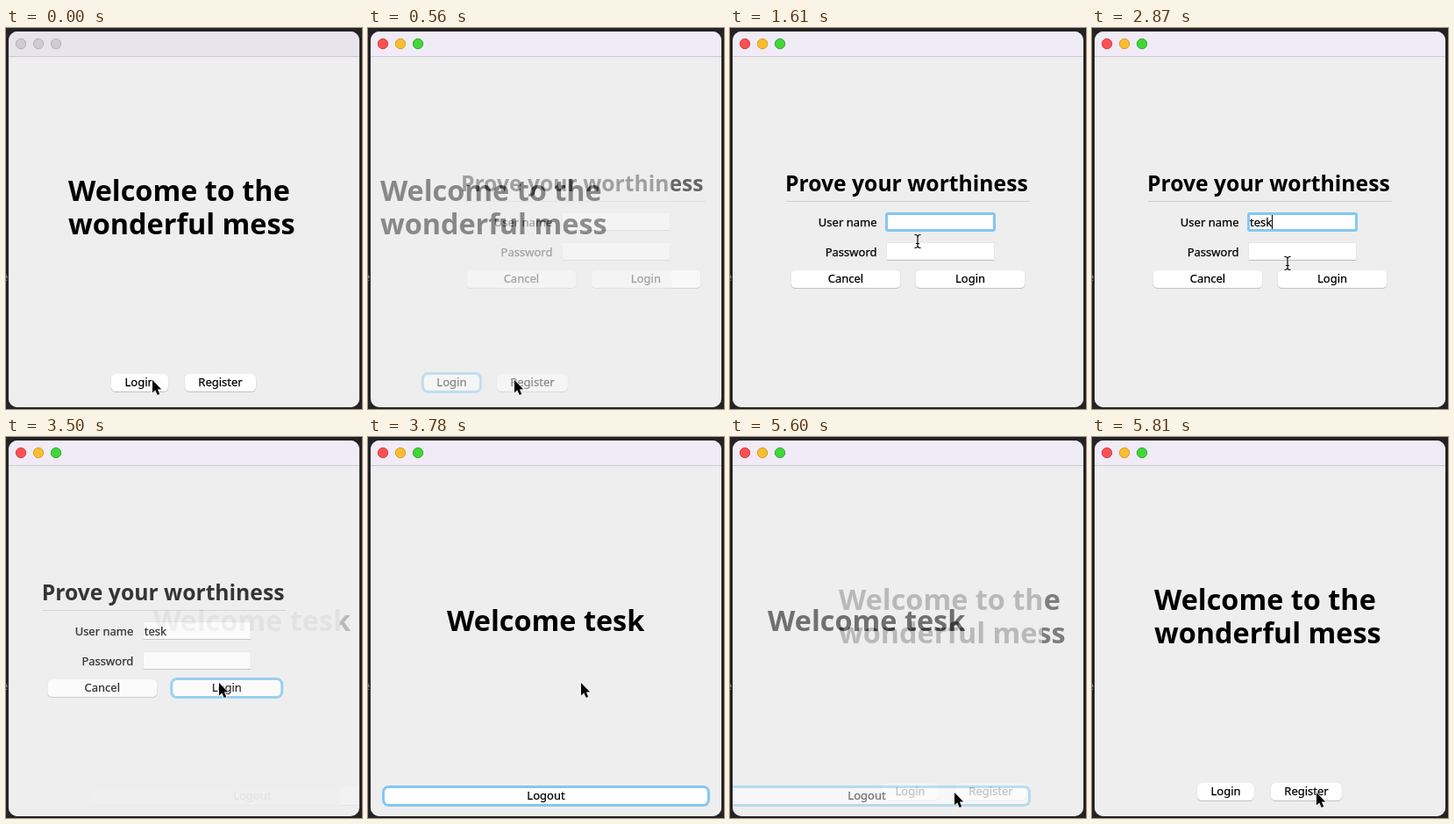
These frames come from a looping animation (406 px wide and 434 px high, 5880 ms). An HTML page:

```html
<!DOCTYPE html>
<html lang="en">
<head>
<meta charset="utf-8">
<title>Sliding login</title>
<style>
  html, body { margin: 0; width: 100%; height: 100%; overflow: hidden; background: #242225; }
  svg { display: block; width: 406px; height: 434px; }
  text { font-family: "Noto Sans", "Open Sans", sans-serif; font-size: 13px; fill: #000; stroke: #000; stroke-width: .25px; }
  .big { font-size: 32.4px; font-weight: 700; stroke: none; }
  .head { font-size: 24.7px; font-weight: 700; stroke: none; }
  .mid { text-anchor: middle; }
  .end { text-anchor: end; }
  .ring { fill: none; stroke: #83c8f2; stroke-width: 3; }
</style>
</head>
<body>
<svg viewBox="0 0 406 434">
  <defs>
    <clipPath id="win"><rect x="3" y="4" width="400" height="428" rx="10"/></clipPath>
    <clipPath id="pane"><rect x="3" y="33" width="400" height="399"/></clipPath>
  </defs>
  <rect width="406" height="434" fill="#242225"/>
  <text x="-5" y="288" style="fill:#8a888b;stroke:none">e</text>
  <g clip-path="url(#win)">
    <rect x="3" y="4" width="400" height="428" fill="#eee"/>
    <rect id="bar" x="3" y="4" width="400" height="28"/>
    <rect x="3" y="32" width="400" height="1" fill="#cdcbcf"/>
    <g id="lights"></g>
    <g id="cards" clip-path="url(#pane)"></g>
  </g>
  <path id="arrow" d="M0 0V14.6L3.3 11.5L5.7 17L8.2 15.9L5.9 10.6H10.2Z" stroke="#fff" stroke-width="1.2" stroke-linejoin="round" paint-order="stroke"/>
  <g id="beam" fill="none" stroke-linecap="square">
    <path d="M-3 -7.5Q0 -7.5 0 -5Q0 -7.5 3 -7.5M0 -5V5M-3 7.5Q0 7.5 0 5Q0 7.5 3 7.5M-1.5 2.5H1.5" stroke="#fff" stroke-width="2.6" opacity=".7"/>
    <path d="M-3 -7.5Q0 -7.5 0 -5Q0 -7.5 3 -7.5M0 -5V5M-3 7.5Q0 7.5 0 5Q0 7.5 3 7.5M-1.5 2.5H1.5" stroke="#000" stroke-width="1.2"/>
  </g>
</svg>
<script>
const LOOP = 5880, TICK = 70, SLIDE = 400, SHIFT = 100;
const NAME = 'tesk';
const $ = id => document.getElementById(id);
const show = (el, on) => el.setAttribute('display', on ? 'inline' : 'none');

const ring = (id, x, y, w, h, r) =>
  `<rect id="${id}" class="ring" x="${x - .5}" y="${y - .5}" width="${w + 1}" height="${h + 1}" rx="${r}"/>`;

const button = (label, x, y, w, id) => `
  <rect x="${x - .5}" y="${y}" width="${w + 1}" height="21" rx="6" fill="#dcdcdc"/>
  <rect x="${x}" y="${y + .6}" width="${w}" height="20.4" rx="5.5" fill="#c2c2c2"/>
  <rect x="${x}" y="${y}" width="${w}" height="20" rx="5.5" fill="#fff"/>
  ${id ? ring(id, x, y, w, 20, 6) : ''}
  <text class="mid" x="${x + w / 2}" y="${y + 14.3}">${label}</text>`;

const field = y => `
  <rect x="178.5" y="${y - .5}" width="123" height="20.5" fill="#e0e0e0"/>
  <rect x="179" y="${y}" width="122" height="19" fill="#fff"/>
  <rect x="179" y="${y + 19}" width="122" height="1" fill="#bdbdbd"/>`;

const pages = [
  `<text class="big" x="71" y="197">Welcome to the</text>
   <text class="big" x="71" y="235">wonderful mess</text>
   ${button('Login', 120, 394, 65, 'ringStart')}
   ${button('Register', 204, 394, 81)}`,
  `<text class="head" x="63" y="186">Prove your worthiness</text>
   <rect x="64" y="197" width="278" height="1" fill="#d0d0d0"/>
   <text class="end" x="167.5" y="226">User name</text>
   <text class="end" x="167.5" y="260">Password</text>
   ${field(211)}${field(245)}
   ${ring('ringUser', 179, 212, 122, 18, 1.5)}
   <text id="typed" x="180" y="226"></text>
   <rect id="caret" y="213" width="1" height="16"/>
   ${button('Cancel', 69.5, 276, 125)}
   ${button('Login', 211.5, 276, 125, 'ringLogin')}`,
  `<text class="big mid" x="202.7" y="221">Welcome ${NAME}</text>
   ${button('Logout', 18, 399, 370, 'ringOut')}`
];

$('cards').innerHTML = pages.map(p =>
  `<g><rect x="3" y="33" width="400" height="399" fill="#eee"/>${p}</g>`).join('');
const cards = [...$('cards').children];

$('lights').innerHTML = [17, 37, 57].map(x => `<circle cx="${x}" cy="18" r="5.7"/>`).join('');
const lights = [...$('lights').children];
const lit = [['#fa5054', '#d93f43'], ['#f8bd30', '#d99e22'], ['#44d43c', '#2fae2b']];
const dim = ['#cfcad3', '#b5b0b9'];

const slides = [341, 3378, 5408];
const keys = [2170, 2450, 2660, 2800];
// start, end, x, y
const moves = [
  [980, 1610, 214, 243],
  [2730, 2870, 223, 268],
  [2870, 3220, 243, 280],
  [3990, 4620, 254, 397],
  [4620, 4900, 256, 405]
];

const smooth = x => x * x * (3 - 2 * x);
const part = (t, a, b) => Math.min(1, Math.max(0, (t - a) / (b - a)));

function pointer(t) {
  let x = 167, y = 401;
  for (const [a, b, tx, ty] of moves) {
    const k = smooth(part(t, a, b));
    x += (tx - x) * k;
    y += (ty - y) * k;
  }
  return [x, y];
}

function place(card, dx, alpha) {
  show(card, true);
  card.setAttribute('transform', `translate(${dx.toFixed(2)} 0)`);
  card.setAttribute('opacity', alpha.toFixed(3));
}

function drawCards(t) {
  cards.forEach(c => show(c, false));
  const done = slides.filter(s => t >= s + SLIDE).length;
  const now = cards[done % 3];
  if (done < 3 && t > slides[done]) {
    const next = cards[(done + 1) % 3];
    const p = smooth((t - slides[done]) / SLIDE);
    $('cards').append(next, now);
    place(next, SHIFT * (1 - p), p);
    place(now, -SHIFT * p, 1 - p);
  } else place(now, 0, 1);
}

function draw(t) {
  const active = t >= 280;
  $('bar').setAttribute('fill', active ? '#f0ebf7' : '#e8e4ec');
  lights.forEach((c, i) => {
    const [fill, edge] = active ? lit[i] : dim;
    c.setAttribute('fill', fill);
    c.setAttribute('stroke', edge);
  });

  drawCards(t);
  show($('ringStart'), active && t < 770);
  show($('ringUser'), t >= 770 && t < 3360);
  show($('ringLogin'), t >= 3360 && t < 3780);
  show($('ringOut'), t >= 3780);

  const typed = $('typed');
  typed.textContent = NAME.slice(0, keys.filter(k => t >= k).length);
  const blink = t >= 770 && t < 1260 || t >= 1750 && t < 3360;
  show($('caret'), blink);
  if (blink) $('caret').setAttribute('x', Math.round(180 + typed.getComputedTextLength()));

  const [x, y] = pointer(t);
  const overField = t >= 770 && t < 3360 && y > 207 && y < 270;
  show($('arrow'), !overField);
  show($('beam'), overField);
  $(overField ? 'beam' : 'arrow').setAttribute('transform', `translate(${x.toFixed(1)} ${y.toFixed(1)})`);
}

const start = performance.now();
function frame() {
  const t = (performance.now() - start) % LOOP;
  draw(Math.floor(t / TICK) * TICK);
  requestAnimationFrame(frame);
}
frame();
</script>
</body>
</html>
```
